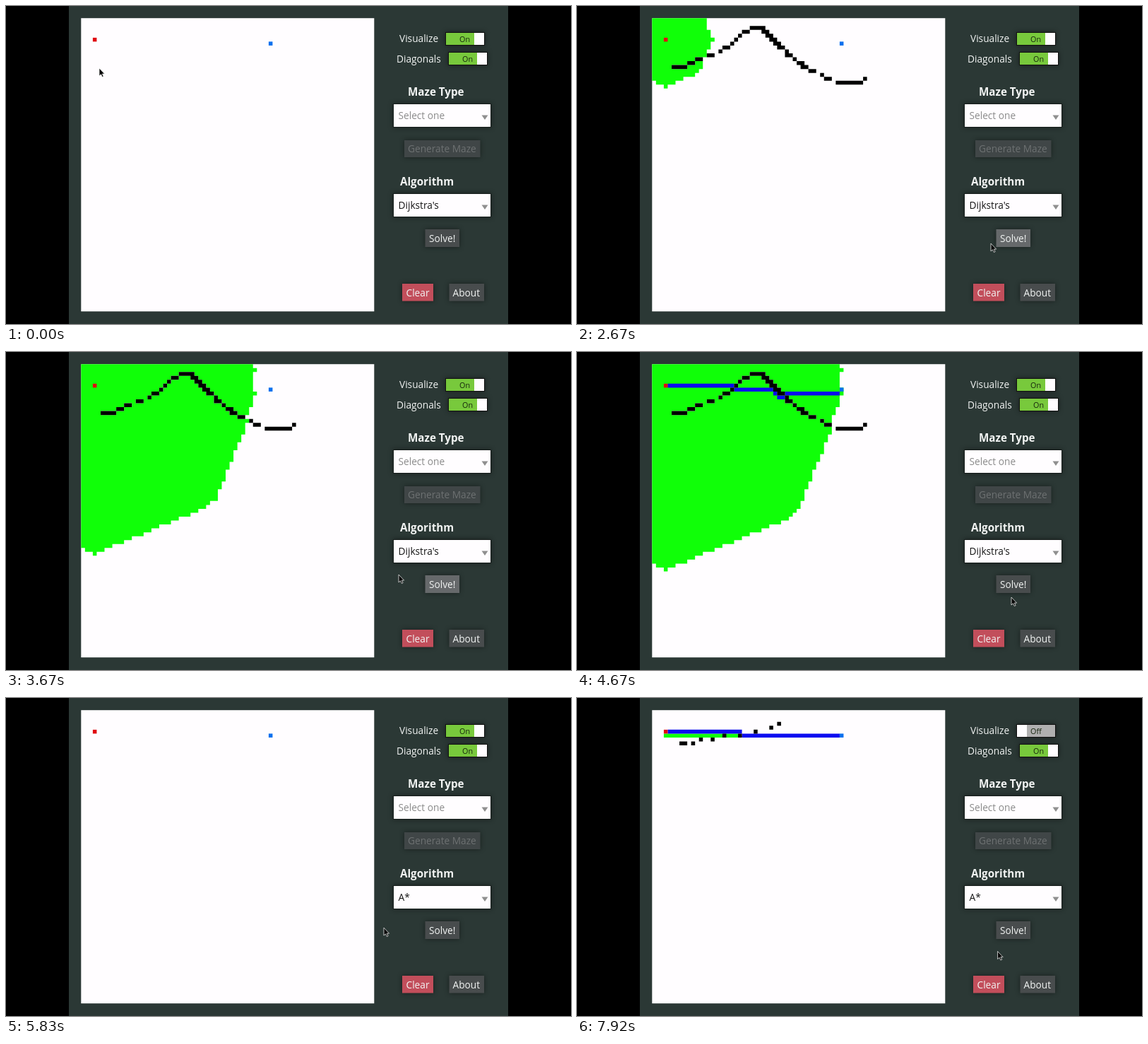
These frames come from a looping animation (800 px wide and 450 px high, 8 s). An HTML page with a canvas:

```html
<!DOCTYPE html>
<html lang="en">
<head>
<meta charset="utf-8">
<title>Pathfinding visualizer</title>
<style>
  html, body { margin: 0; width: 100%; height: 100%; overflow: hidden; background: #000; }
  canvas, svg { position: absolute; left: 0; top: 0; width: 800px; height: 450px; }
  text { font: 13.7px "Open Sans", "Noto Sans", sans-serif; fill: #f2f4f3; }
  .head { font-weight: 700; font-size: 15.2px; }
  .small { font-size: 10.8px; fill: #16240e; }
  .dark { fill: #161616; }
  .hint { fill: #8a8a8a; }
  .off { fill: #6d7172; }
  .field { fill: #fffdff; stroke: #161d1b; }
  .lift { filter: drop-shadow(0 0 3.5px rgba(0, 0, 0, .45)); }
  .button { fill: #484c4d; }
  .idle { fill: #404647; }
  .hover { fill: #66696b; }
  .clear { fill: #c24e5b; }
  .clear.hover { fill: #d2626e; }
  .arrow { fill: #8f8f8f; }
  .frame { fill: #111; }
  .on { fill: #78c93c; }
  .knob { fill: #fffdff; }
  #shade, #menu { visibility: hidden; }
  .open #shade, .open #menu { visibility: visible; }
</style>
</head>
<body>
<canvas id="board" width="800" height="450"></canvas>
<svg id="ui" viewBox="0 0 800 450">
  <text x="557" y="51">Visualize</text>
  <g class="lift">
    <rect class="frame" x="622" y="37" width="56" height="19"/>
    <rect id="track" class="on" x="623" y="38" width="54" height="17"/>
    <rect id="knob" class="knob" x="663" y="38" width="14" height="17"/>
  </g>
  <text id="state" class="small" x="642" y="50.5">On</text>

  <text x="553" y="79.5">Diagonals</text>
  <g class="lift">
    <rect class="frame" x="626" y="65" width="56" height="19"/>
    <rect class="on" x="627" y="66" width="54" height="17"/>
    <rect class="knob" x="667" y="66" width="14" height="17"/>
  </g>
  <text class="small" x="646" y="79">On</text>

  <text class="head" x="569" y="127">Maze Type</text>
  <rect class="field lift" x="548.5" y="138.5" width="138" height="33"/>
  <text class="hint" x="555.5" y="160">Select one</text>
  <path class="arrow" d="M673.5 154.5h9l-4.5 6.5z"/>
  <rect class="button idle lift" x="564" y="190" width="107.5" height="24"/>
  <text class="off" x="569" y="207">Generate Maze</text>

  <text class="head" x="558" y="253.5">Algorithm</text>
  <rect id="solve" class="button lift" x="593.5" y="316" width="48.5" height="25"/>
  <text x="599" y="333.5">Solve!</text>
  <rect id="clear" class="clear lift" x="561" y="393" width="44" height="24.5"/>
  <text x="566.5" y="410.5">Clear</text>
  <rect class="button lift" x="627.5" y="393" width="49.5" height="24.5"/>
  <text x="632.5" y="410.5">About</text>

  <rect id="shade" width="800" height="450" opacity=".71"/>
  <rect class="field lift" x="548.5" y="265.5" width="138" height="33"/>
  <text id="choice" class="dark" x="555.5" y="287">Dijkstra's</text>
  <path id="arrow" class="arrow"/>
  <g id="menu">
    <rect class="field" x="548.5" y="298.5" width="137" height="63.5" stroke-width=".7"/>
    <rect id="mark" x="549" width="136" height="21" fill="#b8e1ec"/>
    <text class="hint" x="551.5" y="314.5">Select one</text>
    <text class="dark" x="551.5" y="336">Dijkstra's</text>
    <text class="dark" x="551.5" y="357">A*</text>
  </g>
  <path id="cursor" d="M0 0V11L2.5 8.8 4.3 12.5 6.1 11.7 4.4 8.1H7.6Z"
        fill="#080808" stroke="#fff" stroke-width=".7"/>
</svg>
<script>
const $ = id => document.getElementById(id);
const ctx = $("board").getContext("2d");
const SIZE = 75, LEFT = 106.3, TOP = 17.2, SPAN = 415, CELL = SPAN / SIZE;
const LOOP = 8000, SOLVE = 2450, CLEAR = 5060, OPEN = 5350, CHOOSE = 5800;
const TOGGLE = 7330, SOLVE_AGAIN = 7780, PATH_START = 3880, PATH_TIME = 720;
const start = [3, 5], goal = [48, 6];

const clamp = k => Math.min(1, Math.max(0, k));
const lerp = (a, b, k) => a + (b - a) * k;
const ease = k => k * k * (3 - 2 * k);

// Height of a polyline of [column, row] points at a column.
function rowAt(line, col) {
  const i = Math.max(1, line.findIndex(p => p[0] >= col));
  const [x0, y0] = line[i - 1], [x1, y1] = line[i];
  return lerp(y0, y1, (col - x0) / (x1 - x0));
}
const cellAt = (line, col) => [Math.floor(col), Math.round(rowAt(line, col))];

function trace(line, step = () => 1) {
  const list = [], end = line[line.length - 1][0];
  for (let col = line[0][0]; col <= end; col += step(col)) list.push(cellAt(line, col));
  return list;
}

const hill = [[5, 12], [9, 11.4], [19, 6.8], [23, 3], [25, 2.2], [28, 2.3], [33.5, 7.45],
  [34, 8.2], [38, 11.42], [45, 15.25], [47, 15.8], [53.5, 15.6], [54, 15.3]];
const ramp = [[7, 8], [22, 5.8], [32, 3]];

// The pen slows down on the descent and skips a few columns.
const skipped = [13, 16, 42, 46];
const hillCells = trace(hill, col => col < 28 ? 1 : .5).filter(c => !skipped.includes(c[0]));
// The second stroke speeds up, so its dots spread out.
const dotCells = [];
for (let i = 0, col = 7; i < 10; i++) {
  dotCells.push(cellAt(ramp, col));
  col = Math.min(32, col + Math.min(4, 1 + Math.ceil(i / 2)));
}

const longPath = trace([[4, 5], [20, 5], [21, 6], [30, 6], [32, 8], [33, 8], [34, 7], [47, 7]]);
const shortPath = trace([[4, 5], [22, 5], [23, 6], [47, 6]]);
const expanded = trace([[3, 6], [21, 6]]);

// Uniform-cost search; returns settled cells in order with their distance.
function explore(walls) {
  const closed = new Set(walls.map(String)), best = { [start]: 0 }, order = [];
  const open = [[...start, 0]];
  while (open.length) {
    let pick = 0;
    open.forEach((c, i) => { if (c[2] < open[pick][2] - 1e-9) pick = i; });
    const [x, y, d] = open.splice(pick, 1)[0];
    if (closed.has(`${x},${y}`)) continue;
    closed.add(`${x},${y}`);
    order.push([x, y, d]);
    if (x === goal[0] && y === goal[1]) break;
    for (let dy = -1; dy <= 1; dy++) for (let dx = -1; dx <= 1; dx++) {
      const nx = x + dx, ny = y + dy, key = `${nx},${ny}`, cost = d + Math.hypot(dx, dy);
      const inside = Math.min(nx, ny) >= 0 && Math.max(nx, ny) < SIZE;
      if (inside && !closed.has(key) && cost < (best[key] ?? Infinity) - 1e-9) {
        best[key] = cost;
        open.push([nx, ny, cost]);
      }
    }
  }
  return order;
}
const flood = explore(hillCells);
const within = r => flood.filter(c => c[2] < r + .01).length;
const early = within(12), late = within(43);

const strokes = [
  { line: hill, from: 80, to: 1670, first: 5, last: 54 },
  { line: ramp, from: 6240, to: 6950, first: 7, last: 32 }
];
const penAt = (s, k) => {
  const col = lerp(s.first, s.last, k);
  return [LEFT + (col + .5) * CELL, TOP + (rowAt(s.line, col) + .5) * CELL];
};
const ends = s => [[s.from, ...penAt(s, 0)], [s.to, ...penAt(s, 1)]];

// Stops of the pointer as [time, x, y]; it eases from one to the next.
const stops = [
  [0, 132, 88], ...ends(strokes[0]),
  [2400, 606, 328], [2670, 586, 336], [3670, 556, 315], [4100, 650, 342],
  [4670, 615, 347], [5000, 583, 409], [5420, 585, 290], [5740, 572, 350],
  ...ends(strokes[1]),
  [7080, 650, 46], [7300, 650, 46], [7740, 606, 335], [7850, 602, 370], [LOOP, 588, 345]
];

function pointerAt(t) {
  const stroke = strokes.find(s => t >= s.from && t <= s.to);
  if (stroke) return penAt(stroke, (t - stroke.from) / (stroke.to - stroke.from));
  const i = Math.max(1, stops.findIndex(p => p[0] >= t));
  const [t0, x0, y0] = stops[i - 1], [t1, x1, y1] = stops[i];
  const k = ease((t - t0) / (t1 - t0));
  return [lerp(x0, x1, k), lerp(y0, y1, k)];
}

function paint(list, color) {
  ctx.fillStyle = color;
  ctx.beginPath();
  for (const [x, y] of list) ctx.rect(LEFT + x * CELL, TOP + y * CELL, CELL, CELL);
  ctx.fill();
}

function drawBoard(t, x) {
  const green = "#10ff08", blue = "#0a0af0";
  const passed = (list, lag) => list.filter(c => LEFT + (c[0] + .5) * CELL < x - lag);
  ctx.fillStyle = "#000";
  ctx.fillRect(0, 0, 800, 450);
  ctx.fillStyle = "#2b3835";
  ctx.fillRect(89, 0, 622, 450);
  ctx.fillStyle = "#fffdff";
  ctx.fillRect(LEFT, TOP, SPAN, SPAN);

  if (t < CLEAR) {
    const count = Math.round(lerp(early, late, (t - 2670) / 1000));
    const part = clamp((t - PATH_START) / PATH_TIME);
    paint(flood.slice(0, Math.max(0, count)), green);
    paint(longPath.slice(0, Math.round(part * longPath.length)), blue);
    paint(passed(hillCells, 0), "#000");
  } else if (t > strokes[1].from) {
    if (t > SOLVE_AGAIN) {
      paint(expanded, green);
      paint(shortPath, blue);
    }
    paint(passed(dotCells, 30), "#000");
  }
  paint([start], "#e00810");
  paint([goal], "#0a70ee");
}

function frame() {
  const t = performance.now() % LOOP;
  const [x, y] = pointerAt(t);
  const over = (x0, y0, x1, y1) => x >= x0 && x <= x1 && y >= y0 && y <= y1;
  drawBoard(t, x);

  const isOpen = t >= OPEN && t < CHOOSE;
  $("ui").classList.toggle("open", isOpen);
  $("arrow").setAttribute("d", isOpen ? "M673.5 288h9l-4.5-6.5z" : "M673.5 281.5h9l-4.5 6.5z");
  $("mark").setAttribute("y", y > 341 ? 341 : 320);
  $("choice").textContent = t < CHOOSE ? "Dijkstra's" : "A*";

  const busy = t > SOLVE && t < PATH_START;
  $("solve").classList.toggle("hover", busy || over(593, 316, 642, 341));
  $("clear").classList.toggle("hover", over(561, 393, 605, 418));

  const slide = clamp((t - TOGGLE) / 150);
  $("knob").setAttribute("x", lerp(663, 623, slide));
  $("track").style.fill = slide > .5 ? "#b0b0b0" : "";
  $("state").textContent = slide > .5 ? "Off" : "On";
  $("cursor").setAttribute("transform", `translate(${x} ${y})`);
  requestAnimationFrame(frame);
}
requestAnimationFrame(frame);
</script>
</body>
</html>
```
